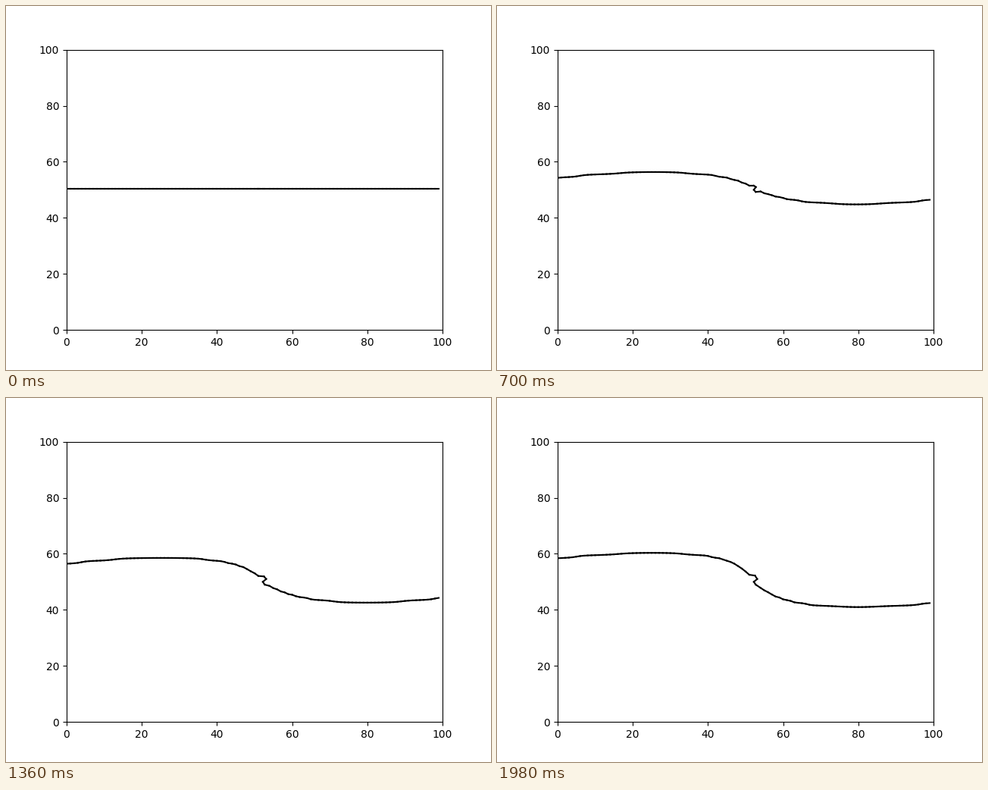
A matplotlib script that plays this animation: 640x480 px, repeating every 2 s.

```python
import numpy as np
import matplotlib.pyplot as plt
from matplotlib.animation import FuncAnimation
from matplotlib.collections import LineCollection

FRAMES, STEP = 100, 20
REST = 50.5   # height of the flat interface
SHARP = 0.45  # width of the interface in grid rows


def bulge(u, s, peak, scale):
    """Steep rise next to the fold (u=0), then an arch that flattens with s."""
    return (1 - np.exp(-u / scale)) * (1 - (2.45 - 1.18 * s) * (u - peak) ** 2)


def on_grid(y):
    """Height of the zero level when a tanh front is sampled on whole rows."""
    row = np.floor(y)
    f = y - row
    below, above = np.tanh(f / SHARP), np.tanh((1 - f) / SHARP)
    return row + below / (below + above)


def fold(s):
    """The S-bend in the middle, where the height is not a function of x."""
    tip = 51.5 + 1.6 * np.clip((s - 0.6) / 0.3, 0, 1)
    half = 0.5 * min(1, 1.5 * s)
    return np.array([
        (tip - 0.6, REST + max(0, 1.3 * s - 0.1)),
        (tip, REST + half),
        (52.2, REST - half),
        (52.7, REST - 1.5 * min(1, s)),
    ])


def interface(t):
    s = np.sqrt(t)  # the displacement grows with the root of time
    rise = max(0, 7 * s - 0.1)
    xl, xr = np.arange(0, 52), np.arange(54, 100)
    yl = REST + rise * bulge((52.3 - xl) / 52.3, s, 0.5, 0.085)
    yr = REST - 0.98 * rise * bulge((xr - 51.8) / 47.2, s, 0.57, 0.11)
    return np.vstack([
        np.column_stack([xl, on_grid(yl)]),
        fold(s),
        np.column_stack([xr, on_grid(yr)]),
    ])


fig, ax = plt.subplots(figsize=(6.4, 4.8), dpi=100)
ax.set(xlim=(0, 100), ylim=(0, 100))
# One stroke per grid cell: the overlapping caps give the beaded line.
line = LineCollection([], colors="black", linewidths=1.5, capstyle="projecting")
ax.add_collection(line, autolim=False)


def update(i):
    pts = interface(i * STEP / 1000)
    line.set_segments(np.stack([pts[:-1], pts[1:]], axis=1))
    return line,


anim = FuncAnimation(fig, update, frames=FRAMES, interval=STEP,
                     repeat=True, repeat_delay=0)
plt.show()
```
